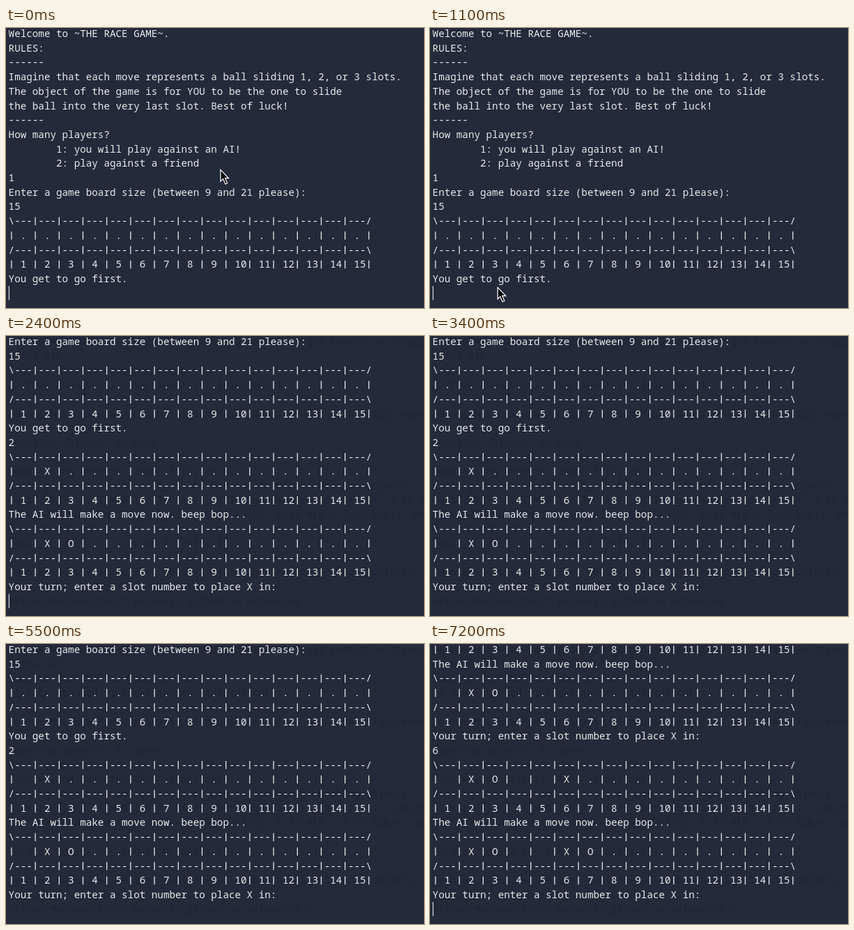
An HTML page with a canvas that plays this animation: 600 px wide and 402 px high, repeating every 8000 ms.

```html
<!DOCTYPE html>
<html lang="en">
<head>
<meta charset="utf-8">
<title>Terminal race game</title>
<style>
  html, body { margin: 0; width: 100%; height: 100%; overflow: hidden; background: #242a3a; }
  canvas { display: block; }
</style>
</head>
<body>
<canvas id="stage" width="600" height="402"></canvas>
<script>
const ctx = document.getElementById('stage').getContext('2d');
const LOOP = 8000, ROWS = 19, SLOTS = 15;
const LEFT = 3.6, COL = 8.55, BASELINE = 13, ROW = 20.7;
const FIRST_MOVE = 2200, FIRST_REPLY = 2400, SECOND_MOVE = 6600, SECOND_REPLY = 7200;

// Slots up to the furthest mark are blank unless marked; the rest show a dot.
function board(marks = {}) {
  const last = Math.max(0, ...Object.keys(marks).map(Number));
  const slots = Array.from({ length: SLOTS }, (_, i) => i + 1);
  const edge = slots.map(() => '---').join('|');
  const cells = slots.map(n => ` ${marks[n] || (n <= last ? ' ' : '.')} |`).join('');
  const numbers = slots.map(n => ' ' + String(n).padEnd(2) + '|').join('');
  return ['\\' + edge + '/', '|' + cells, '/' + edge + '\\', '|' + numbers];
}

const aiMove = 'The AI will make a move now. beep bop...';
const yourTurn = 'Your turn; enter a slot number to place X in:';
const intro = [
  'Welcome to ~THE RACE GAME~.',
  'RULES:',
  '------',
  'Imagine that each move represents a ball sliding 1, 2, or 3 slots.',
  'The object of the game is for YOU to be the one to slide',
  'the ball into the very last slot. Best of luck!',
  '------',
  'How many players?',
  '        1: you will play against an AI!',
  '        2: play against a friend',
  '1',
  'Enter a game board size (between 9 and 21 please):',
  '15',
  ...board(),
  'You get to go first.'
];
const afterFirst = [...intro, '2', ...board({ 2: 'X' }), aiMove,
  ...board({ 2: 'X', 3: 'O' }), yourTurn];
const afterSecond = [...afterFirst, '6', ...board({ 2: 'X', 3: 'O', 6: 'X' }), aiMove,
  ...board({ 2: 'X', 3: 'O', 6: 'X', 7: 'O' }), yourTurn];

// Faint shell session behind the game.
const prompt = 'Pelums-MacBook-Pro-7 pelumiro.github.io pelumiro$ ';
const shell = [
  prompt + 'git commit -m "croppe',
  'd the GIF"',
  '[master 7c8f288] cropped the GIF',
  ' 1 file changed, 1 insertion(+), 1 deletion(-)',
  '',
  prompt + 'git push origin maste',
  'r',
  'Counting objects: 5, done.',
  'Delta compression using up to 4 threads.',
  'Compressing objects: 100% (5/5), done.',
  'Writing objects:  60% (3/5), 5.91 MiB | 4.77 MiB/s  Writing objects:',
  ' 80% (4/5), 5.91 MiB | 4.77 MiB/s  Writing objects: 100% (5/5), 5.91 Mi',
  'B | 4.77 MiB/s  Writing objects: 100% (5/5), 6.32 MiB | 4.25 MiB/s, don',
  'e.',
  'Total 5 (delta 3), reused 0 (delta 0)',
  '',
  'remote: Resolving deltas: 100% (3/3), completed with 3 local objects.',
  '   master -> master',
  prompt + '|'
];

// Vertical bars are only as tall as capitals, so they are drawn as strokes.
function drawLine(line, row) {
  const y = BASELINE + row * ROW;
  ctx.fillText(line.replaceAll('|', ' '), LEFT, y);
  [...line].forEach((char, col) => {
    if (char === '|') ctx.fillRect(LEFT + (col + 0.5) * COL - 0.65, y - 10.6, 1.3, 11.6);
  });
}

function drawLines(lines, color) {
  ctx.fillStyle = color;
  lines.forEach(drawLine);
}

function caretVisible(t) {
  const hidden = [[1400, 1900], [3400, 3900], [4500, 5000], [5500, 6000]];
  return !hidden.some(([from, to]) => t >= from && t < to);
}

const smooth = p => p * p * (3 - 2 * p);

function drawPointer(t) {
  const p = Math.min(1, Math.max(0, Math.floor((t - 500) / 100) + 1) / 9);
  const x = 308 - 231 * smooth(p ** 0.8);
  const y = 203.5 + 169 * smooth(Math.min(1, p * 9 / 7));
  const outline = [[0, 0], [0, 16.5], [3.7, 13], [6.8, 20.5], [9.6, 19.3], [6.5, 12], [11.5, 12]];
  ctx.beginPath();
  outline.forEach(([dx, dy]) => ctx.lineTo(x + dx, y + dy));
  ctx.closePath();
  ctx.fillStyle = '#000';
  ctx.fill();
  ctx.strokeStyle = '#f4f4f6';
  ctx.lineWidth = 1.3;
  ctx.stroke();
}

function draw(t) {
  ctx.fillStyle = '#242a3a';
  ctx.fillRect(0, 0, 600, 402);
  ctx.font = '500 14.25px "Noto Sans Mono", "DejaVu Sans Mono", monospace';

  const log = t < FIRST_REPLY ? intro : t < SECOND_REPLY ? afterFirst : afterSecond;
  const typed = t >= FIRST_MOVE && t < FIRST_REPLY ? '2'
    : t >= SECOND_MOVE && t < SECOND_REPLY ? '6' : '';

  if (t >= 2300) drawLines(shell, 'rgba(8, 10, 20, 0.13)');
  drawLines([...log, typed].slice(-ROWS), '#e8e9ec');

  if (caretVisible(t)) {
    ctx.fillStyle = '#d9dade';
    ctx.fillRect(3.8 + typed.length * COL, 370.4, 1.2, 20.3);
  }
  if (t < FIRST_MOVE) drawPointer(t);
}

const start = performance.now();
function tick() {
  draw((performance.now() - start) % LOOP);
  requestAnimationFrame(tick);
}
tick();
</script>
</body>
</html>
```
